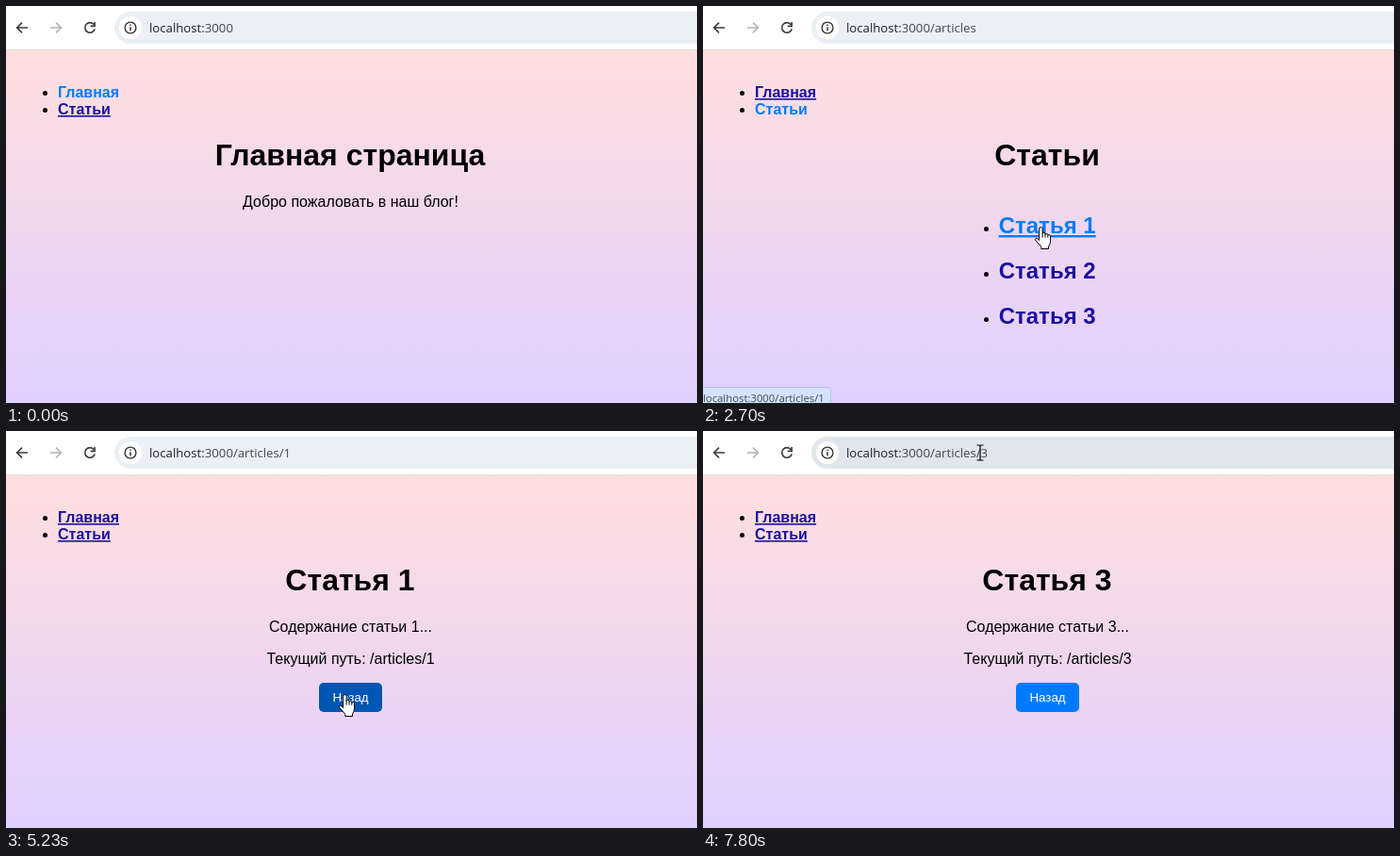
These frames come from a looping animation (733 by 421 pixels, 8 s). An HTML page:

```html
<!DOCTYPE html>
<html lang="ru">
<head>
<meta charset="utf-8">
<style>
  html, body { margin: 0; width: 100%; height: 100%; overflow: hidden; background: #fff; }
  svg { display: block; width: 733px; height: 421px; font-family: "Liberation Sans", Arial, sans-serif; }
  .ui { font-family: "Open Sans", "Noto Sans", sans-serif; }
  .icon { fill: none; stroke: #3a3d41; stroke-width: 1.6; }
  .bold { font-weight: bold; }
  .mid { text-anchor: middle; }
  .link { fill: #1c10a0; }
  .active { fill: #007bff; }
  .line { text-decoration: underline; }
  #list .line { text-decoration-thickness: 2px; }
</style>
</head>
<body>
<svg viewBox="0 0 733 421">
  <defs>
    <linearGradient id="sky" x1="0" y1="0" x2="0" y2="1">
      <stop offset="0" stop-color="#ffdfde"/>
      <stop offset="1" stop-color="#e0cfff"/>
    </linearGradient>
  </defs>

  <rect width="733" height="46" fill="#fff"/>
  <rect y="46" width="733" height="375" fill="url(#sky)"/>
  <rect y="46" width="733" height="1" fill="#e3dcde"/>

  <g class="icon">
    <path d="M23 23H12M17 17.6L11.6 23l5.4 5.4"/>
    <path id="forward" d="M47 23H58M53 17.6L58.4 23l-5.4 5.4"/>
    <path d="M93.3 19.8A5.3 5.3 0 1 0 94.2 24.2M94.1 17v4.4h-4.4"/>
  </g>
  <rect id="bar" x="115" y="6" width="660" height="34" rx="17"/>
  <circle cx="132" cy="23" r="12" fill="#fff"/>
  <circle cx="132" cy="23" r="5.9" fill="none" stroke="#333" stroke-width="1.4"/>
  <path d="M132 22.3v4M132 19.4v1.5" stroke="#333" stroke-width="1.5"/>
  <text class="ui" x="152" y="28" font-size="13.2" fill="#202124">localhost:<tspan id="url" fill="#45484d"></tspan></text>

  <circle cx="41.5" cy="92.5" r="2.5"/>
  <circle cx="41.5" cy="110.5" r="2.5"/>
  <g class="bold" font-size="16">
    <text id="navHome" x="55" y="97">Главная</text>
    <text id="navList" x="55" y="115">Статьи</text>
  </g>
  <text id="title" class="bold mid" x="365" y="169" font-size="32"></text>
  <text id="lead" class="mid" x="365.5" y="213" font-size="16"></text>

  <g id="list" class="bold" font-size="24"></g>

  <g id="article" class="mid">
    <text id="route" x="365.5" y="247" font-size="16"></text>
    <rect id="button" x="332" y="267" width="67" height="31" rx="5"/>
    <text x="365.5" y="287" font-size="13.333" fill="#fff">Назад</text>
  </g>

  <g id="status">
    <rect id="bubble" x="-8" y="404.5" height="30" rx="4.5" fill="#d3e3fd" stroke="#b9c6e6"/>
    <text id="statusText" class="ui" x="0" y="420" font-size="11.32" fill="#44494f"></text>
  </g>

  <g id="cursor" stroke-linejoin="round">
    <path id="arrow" d="M.5.5V16.6l3.8-3.5 2.8 6 2.6-1.2-2.7-5.8h5.1z" fill="#fff" stroke="#000"/>
    <path id="hand" transform="translate(-6 0)" fill="#fff" stroke="#000"
      d="M4.7 13.6V2.2a1.7 1.7 0 0 1 3.4 0V7.6a1.45 1.45 0 0 1 2.9.3v.7a1.4 1.4 0 0 1 2.8.3v.8a1.35 1.35 0 0 1 2.7.4V15.5q0 3-2 5.6V23.5H6.8V21.2L1 14.8q-1-2 .4-2.5 1.2-.4 3.3 2.2zM8.1 7.6v4M11 8.6v3M13.8 9.7v2"/>
    <path id="beam" fill="none" stroke="#000" stroke-width="1.2"
      d="M-3.5-8h2.3Q0-8 0-7 0-8 1.2-8h2.3M0-7V7M-3.5 8h2.3Q0 8 0 7 0 8 1.2 8h2.3"/>
  </g>
</svg>

<script>
const LOOP = 8000;
const LAG = 40; // the page reacts a little after the pointer moves
const ITEMS = [1, 2, 3];
const $ = id => document.getElementById(id);

const clicks = [
  { at: 0, page: "home" }, { at: 1500, page: "list" }, { at: 3345, page: 1 },
  { at: 5245, page: "list" }, { at: 6510, page: 3 }
];
const moves = [
  { from: 400, to: 830, x: 75, y: 113 },
  { from: 830, to: 1120, x: 80, y: 106 },
  { from: 2190, to: 2600, x: 358, y: 234 },
  { from: 4505, to: 4720, x: 359, y: 279 },
  { from: 5560, to: 5630, x: 369, y: 297 },
  { from: 5640, to: 5700, x: 369, y: 314 },
  { from: 5960, to: 5970, x: 374, y: 330 },
  { from: 6900, to: 7670, x: 300, y: 24, bend: -60 },
  { from: 7700, to: 7800, x: 294, y: 23 }
];

const clamp = v => Math.min(1, Math.max(0, v));
const ramp = (t, start, length) => clamp((t - start) / length);
const easeOut = p => 1 - (1 - p) ** 2;
const itemY = n => 193 + 48 * n;
const pageAt = t => clicks.findLast(c => c.at <= Math.max(0, t)).page;

function pointerAt(t) {
  let x = 206, y = 418;
  for (const m of moves) {
    const p = easeOut(ramp(t, m.from, m.to - m.from));
    x += (m.x - x) * p + (m.bend || 0) * 4 * p * (1 - p);
    y += (m.y - y) * p;
  }
  return { x, y };
}

// What lies under the pointer: a link address, an item number or a kind of area.
function targetAt(t) {
  const { x, y } = pointerAt(t), page = pageAt(t);
  const inside = (left, right, top, bottom) => x >= left && x <= right && y >= top && y <= bottom;
  if (inside(150, 733, 6, 40)) return "address";
  if (inside(55, 111, 101, 119)) return "menu";
  if (page === "list") return ITEMS.find(n => inside(314, 417, itemY(n) - 24, itemY(n) + 6));
  if (page === "home") return undefined;
  if (inside(332, 399, 267, 298)) return "button";
  if (inside(297, 434, 140, 176) || inside(277, 455, 200, 218) || inside(277, 455, 233, 251)) return "text";
}

const isLink = target => target === "menu" || ITEMS.includes(target);

function recentLink(t) {
  for (let age = LAG; age < 700; age += 20) {
    const target = targetAt(t - age);
    if (isLink(target)) return target;
  }
}

function cursorKind(target) {
  if (isLink(target) || target === "button") return "hand";
  return target === "text" || target === "address" ? "beam" : "arrow";
}

const mix = (a, b, p) => `rgb(${a.map((v, i) => Math.round(v + (b[i] - v) * p))})`;
const show = (id, on) => $(id).style.display = on ? "" : "none";
const style = (id, name) => $(id).setAttribute("class", name);
const statusFade = (t, start, end) => ramp(t, start, 120) - ramp(t, end, 200);

$("list").innerHTML = ITEMS.map(n =>
  `<circle cx="300.5" cy="${itemY(n) - 4.5}" r="2.5"/><text id="item${n}" x="313.7" y="${itemY(n)}">Статья ${n}</text>`
).join("");

function renderPage(t) {
  const page = pageAt(t), hovered = targetAt(t - LAG);
  const isHome = page === "home", isList = page === "list";

  $("url").textContent = "3000" + (isHome ? "" : isList ? "/articles" : "/articles/" + page);
  $("title").textContent = isHome ? "Главная страница" : isList ? "Статьи" : "Статья " + page;
  $("lead").textContent = isHome ? "Добро пожаловать в наш блог!" : isList ? "" : `Содержание статьи ${page}...`;
  $("route").textContent = "Текущий путь: /articles/" + page;
  style("navHome", isHome ? "active" : "link line");
  style("navList", isList ? "active" : "link line");
  show("list", isList);
  show("article", !isHome && !isList);
  for (const n of ITEMS) style("item" + n, hovered === n ? "active line" : "link");

  const wentBack = isList && t > 5000;
  $("forward").style.stroke = wentBack ? "#3a3d41" : "#b8b1b4";
  const press = page === 1 ? ramp(t, 4670, 160) : 0;
  $("button").style.fill = mix([0, 123, 255], [0, 86, 179], press);
  $("bar").style.fill = mix([235, 240, 247], [224, 230, 236], ramp(t, 7600, 80));
}

function renderStatus(t) {
  const link = recentLink(t);
  const tail = ITEMS.includes(link) ? "/" + link : "";
  $("statusText").textContent = "localhost:3000/articles" + tail;
  $("bubble").setAttribute("width", tail ? 143.5 : 132.5);
  $("status").style.opacity = statusFade(t, 960, 3670) + statusFade(t, 5310, 6810);
}

function renderCursor(t) {
  const kind = t < moves[0].from ? "" : cursorKind(targetAt(t));
  for (const name of ["arrow", "hand", "beam"]) show(name, name === kind);
  const { x, y } = pointerAt(t);
  $("cursor").setAttribute("transform", `translate(${Math.round(x)} ${Math.round(y)})`);
}

const start = performance.now();
function frame() {
  const t = (performance.now() - start) % LOOP;
  renderPage(t);
  renderStatus(t);
  renderCursor(t);
  requestAnimationFrame(frame);
}
frame();
</script>
</body>
</html>
```
